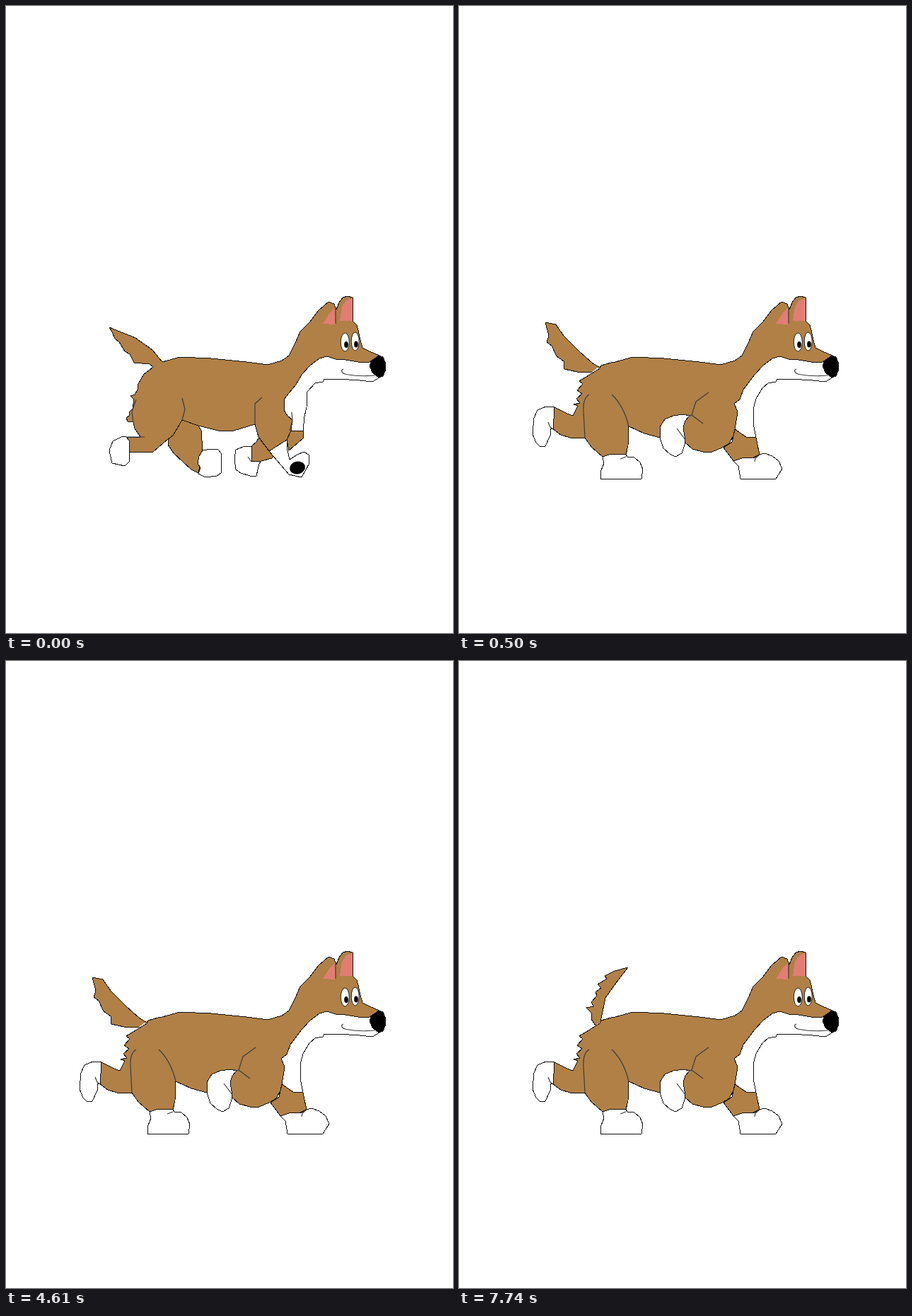
An HTML page for the animation above (8000 ms loop, 632 px wide and 886 px high).

```html
<!DOCTYPE html>
<html lang="en">
<head>
<meta charset="utf-8">
<title>Trotting dog</title>
<style>
  html, body { margin: 0; width: 100%; height: 100%; overflow: hidden; background: #fff; }
  svg { display: block; width: 632px; height: 886px; }
  path { stroke: #111; stroke-width: 1; stroke-linejoin: round; fill: none; shape-rendering: crispEdges; }
  .fur { fill: #b08046; }
  .white { fill: #fff; }
  .pink { fill: #e27d74; stroke: none; }
  .line { stroke: #3c3c3c; stroke-width: 1.2; shape-rendering: auto; }
  .leap, .stand, .low, .high { animation: 8s step-end infinite; }
  .leap { animation-name: leap; }
  .stand { animation-name: stand; }
  .low { animation-name: low; }
  .high { animation-name: high; }
  @keyframes leap { 0% { visibility: visible; } 6.25%, 100% { visibility: hidden; } }
  @keyframes stand { 0% { visibility: hidden; } 6.25%, 100% { visibility: visible; } }
  @keyframes low { 0% { visibility: hidden; } 6.25% { visibility: visible; } 91.875%, 100% { visibility: hidden; } }
  @keyframes high { 0% { visibility: hidden; } 91.875%, 100% { visibility: visible; } }
</style>
</head>
<body>
<svg viewBox="0 0 632 886">
  <g class="leap">
    <!-- far legs -->
    <path class="fur" d="M249 585L272 593 276 600 278 628 272 660 262 655 237 632 229 620 229 612Z"/>
    <path class="white" d="M278 628L290 626 300 627 304 632 305 645 304 660 298 664 282 666 272 661 275 652 271 647 273 636Z"/>
    <path class="fur" d="M347 622L354 616 358 609 372 629 397 613 389 624 376 639 361 643 346 644Z"/>
    <path class="white" d="M347 622L335 623 325 627 323 640 325 655 332 660 345 664 354 664 356 655 358 647 361 643 347 644Z"/>
    <path class="line" d="M342 637L347 644"/>
    <path class="fur" d="M399 600L420 600 420 611 400 628 397 613Z"/>
    <!-- body with tail and near thighs -->
    <path class="fur" d="M246 496L221 503 207 486 183 469 146 454 150 461 154 470 160 475 168 488 175 492 181 504 203 506 208 510 202 515 195 520 187 534 186 542 182 549 176 551 181 556 179 569 174 574 175 578 170 582 172 587 180 588 182 597 190 609 170 609 174 614 174 626 172 630 208 630 229 612 236 607 249 585 272 593 300 600 322 600 352 591 357 609 372 629 397 613 403 600 405 585 398 579 393 571 394 555 400 547 410 535 418 521"/>
    <path class="white" d="M170 609L165 608 151 615 146 628 150 646 168 650 174 644 174 630 174 614Z"/>
    <path class="line" d="M170 609H196M184 556L178 573 180 588M249 554L253 570 249 585M352 591V562L362 553M404 574L405 586 401 600"/>
    <path class="white" d="M372 629L397 613 398 628 401 641 410 635 421 630 428 634 429 646 418 666 400 662Z"/>
    <ellipse cx="412" cy="652.5" rx="11" ry="9" transform="rotate(-12 412 652.5)"/>
    <path d="M402 600H420L422 580 425 567 426 545 437 533"/>
  </g>

  <g class="stand">
    <path class="fur" d="M374 624L386 616 390 598 406 609 420 610 425 634 416 638 388 643Z"/>
    <path class="white" d="M388 643L400 639 418 638 424 634 432 632 443 636 452 643 457 654 448 668H398L395 650Z"/>
    <path class="line" d="M418 644L419 639 425 634"/>
    <path class="fur" d="M246 496L221 503 215 504 201 508 199 512 188 519 170 530 175 534 167 543 174 548 166 555 171 561 162 563 168 565 161 579 153 576 135 567 134 583 133 598 144 606 157 610 178 610 187 623 203 637 215 633 236 634 239 621 240 594 262 604 284 610 318 610 320 617 330 626 345 630 358 630 372 624 382 618 388 607 390 598 393 580 393 571 389 562 397 556 402 542 418 521"/>
    <path class="white" d="M135 567L123 566 111 571 106 582 104 605 109 617 114 622 122 622 129 607 130 597 133 598 134 583Z"/>
    <path class="line" d="M126 588L129 595 133 598"/>
    <path class="white" d="M203 637L215 633 236 634 238 637 248 638 256 645 260 655 258 668H200L201 656 205 646Z"/>
    <path class="line" d="M228 640L236 637M184 549Q175 554 176 573L178 610M216 549Q233 565 240 594"/>
    <path class="white" d="M284 610L284 595 291 584 303 579 317 577 326 579 320 586 317 595 319 608 319 620 315 632 306 637 298 633 289 625Z"/>
    <path class="line" d="M308 597L320 613M353 546L335 559 329 578 345 590M317 577L329 579"/>
    <path d="M390 598L406 609 420 610 416 590 416 570 420 555 429 540 437 533"/>
  </g>

  <path class="fur low" d="M201 508L199 511 188 504 170 488 148 466 137 450 122 447 127 466 124 475 131 480 138 495 148 502 149 513 167 517 188 517"/>
  <path class="fur high" d="M200 510L207 476 222 455 239 433 220 438 206 445 209 449 196 457 201 462 193 468 195 473 187 482 190 488 180 490 187 497 187 506 193 515"/>

  <!-- back, head and muzzle -->
  <path class="fur" d="M246 496L290 498 340 503 370 507 390 501 400 494 409 476 416 460 430 446 442 430 456 418 464 421 467 429 471 419 476 412 483 410 490 412 490 445 496 451 498 458 500 468 504 483 514 488 528 494 514 503 498 503 480 500 466 499 454 495 443 498 430 508 418 521"/>
  <path class="pink" d="M465 426L457 435 448 449 466 450ZM472 445L475 425 481 416 490 413V445Z"/>
  <path class="line" d="M466 427V449"/>
  <path d="M437 533L448 531 450 527 470 527 500 529 518 531 528 525"/>
  <path class="line" d="M477 513C473 514 474 519 481 520.5Q500 524 522 522"/>
  <path fill="#000" style="fill:#000" d="M527 494L533 496 536 503V516L533 523 527 525 518 518 514 508 517 501Z"/>
  <g fill="#fff" stroke="#222">
    <ellipse cx="479.3" cy="475" rx="6" ry="13"/>
    <ellipse cx="493.7" cy="474" rx="5.5" ry="13"/>
  </g>
  <ellipse cx="481" cy="478.5" rx="2.8" ry="4.5"/>
  <ellipse cx="495" cy="478" rx="2.8" ry="4.5"/>
</svg>
</body>
</html>
```
